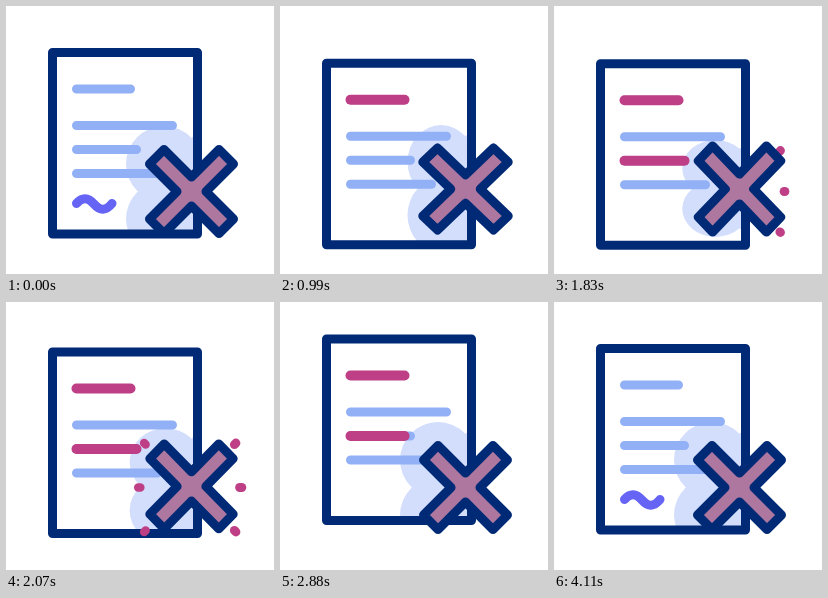
These frames come from a looping animation (268x268 px, 5430 ms). An HTML page:

```html
<!DOCTYPE html>
<html lang="en">
<head>
<meta charset="utf-8">
<title>Rejected document</title>
<style>
  html, body { margin: 0; width: 100%; height: 100%; overflow: hidden; background: #fff; }
  svg { display: block; width: 100%; height: 100%; }
  .stroke { fill: none; stroke-width: 9; stroke-linecap: round; stroke-linejoin: round; }
  .navy { stroke: #002a76; }
  .blue { stroke: #92b0f5; }
  .violet { stroke: #6564f5; }
  .red { stroke: #be3f85; stroke-width: 10; }
</style>
</head>
<body>
<svg viewBox="0 0 268 268">
  <defs>
    <clipPath id="pageClip"><rect id="clipRect" x="46.5" width="145" height="181.5"/></clipPath>
  </defs>
  <g clip-path="url(#pageClip)">
    <g id="blob" fill="#d3defd">
      <circle cx="-27.5" cy="-27.5" r="38"/>
      <circle cx="27.5" cy="-27.5" r="38"/>
      <circle cx="-27.5" cy="27.5" r="38"/>
      <circle cx="27.5" cy="27.5" r="38"/>
    </g>
  </g>
  <g id="page">
    <path class="stroke blue" d="M70.5 83H124.5M70.5 119.5H166.5M70.5 143.5H130.5M70.5 167.5H151.5"/>
    <path id="squiggle" class="stroke violet" pathLength="1" d="M70.5 197.5C76 191 82 191 88 198S100 205 106 197.5"/>
    <path id="mark1" class="stroke red" pathLength="1" d="M70.5 83H124.5"/>
    <path id="mark2" class="stroke red" pathLength="1" d="M70.5 143.5H130.5"/>
    <rect class="stroke navy" x="46.5" y="46.5" width="145" height="181.5"/>
  </g>
  <g id="sparks"></g>
  <path id="cross" class="stroke navy" style="fill:#ae779f"/>
</svg>
<script>
  const LOOP = 5430, START = 330, CX = 185.5, CY = 185.5;
  const $ = id => document.getElementById(id);
  const [blob, page, clipRect, squiggle, mark1, mark2, cross] =
    ['blob', 'page', 'clipRect', 'squiggle', 'mark1', 'mark2', 'cross'].map($);

  // 0 before a, 1 after b, smooth between.
  function ease(t, a, b) {
    const u = Math.min(1, Math.max(0, (t - a) / (b - a)));
    return u * u * (3 - 2 * u);
  }

  // Rises over a..b and falls back over c..d.
  const span = (t, a, b, c, d) => ease(t, a, b) - ease(t, c, d);

  // Damped wave that stretches and squashes the cross.
  function wobble(t) {
    const s = Math.max(0, t - START);
    return 1.59 * Math.exp(-s / 606) * Math.sin(2 * Math.PI * s / 1240);
  }

  function set(el, attrs) {
    for (const name in attrs) el.setAttribute(name, attrs[name]);
  }

  function trim(el, amount) {
    set(el, {
      visibility: amount > .002 ? 'visible' : 'hidden',
      'stroke-dasharray': amount > .999 ? 'none' : `${amount} 2`
    });
  }

  // One arm end and the notch beside it, repeated at quarter turns.
  const outline = [];
  for (let i = 0, arm = [[-27.5, -42], [0, -14.5], [27.5, -42]]; i < 4; i++) {
    outline.push(...arm);
    arm = arm.map(([x, y]) => [-y, x]);
  }

  const sparks = [-45, 0, 45, 135, 180, 225].map(deg => {
    const el = document.createElementNS('http://www.w3.org/2000/svg', 'line');
    el.setAttribute('class', 'stroke red');
    $('sparks').append(el);
    const a = deg * Math.PI / 180, left = deg > 90;
    return {
      el, x: Math.cos(a), y: Math.sin(a),
      cx: left ? CX - 3 : CX,
      reach: deg % 180 ? 12.5 : 0,
      birth: left ? 1900 : 1560
    };
  });

  function drawSparks(t) {
    const half = 1.5 * ease(t, 1600, 2340);
    for (const s of sparks) {
      const r = 45 + s.reach + (t - 1830) * .0175;
      const width = 9 * span(t, s.birth, s.birth + 200, 2570, 2700);
      set(s.el, {
        x1: s.cx + s.x * (r - half), y1: CY + s.y * (r - half),
        x2: s.cx + s.x * (r + half), y2: CY + s.y * (r + half),
        visibility: width > .1 ? 'visible' : 'hidden'
      });
      s.el.style.strokeWidth = width;
    }
  }

  function draw(t) {
    const y = 16 * ease(t, START, 1400) - 26 * ease(t, 1530, 2640) + 10 * ease(t, 2730, 3800);
    set(page, { transform: `translate(0 ${y})` });
    set(clipRect, { y: 46.5 + y });

    trim(squiggle, 1 - span(t, START, 870, 3570, 4110));
    trim(mark1, span(t, 480, 1000, 3200, 3720));
    trim(mark2, span(t, 1080, 1600, 2780, 3300));

    const w = wobble(t), lift = span(t, START, 600, 1830, 2280);
    const blobX = 1 - .12 * lift - .05 * w;
    const blobY = 1 + .24 * ease(t, START, 600) - .5 * ease(t, 700, 1250) + .26 * ease(t, 1830, 2280);
    set(blob, { transform: `translate(${CX} ${CY - 3 * lift}) scale(${blobX} ${blobY})` });

    // Points are scaled rather than the element, so the outline keeps its weight.
    const sx = 1 - .155 * w, sy = 1 + .2 * w, cy = CY - 2.5 * lift;
    set(cross, { d: 'M' + outline.map(([px, py]) => `${CX + px * sx} ${cy + py * sy}`).join('L') + 'Z' });
    drawSparks(t);
  }

  const begin = performance.now();
  function tick() {
    draw((performance.now() - begin) % LOOP);
    requestAnimationFrame(tick);
  }
  tick();
</script>
</body>
</html>
```
